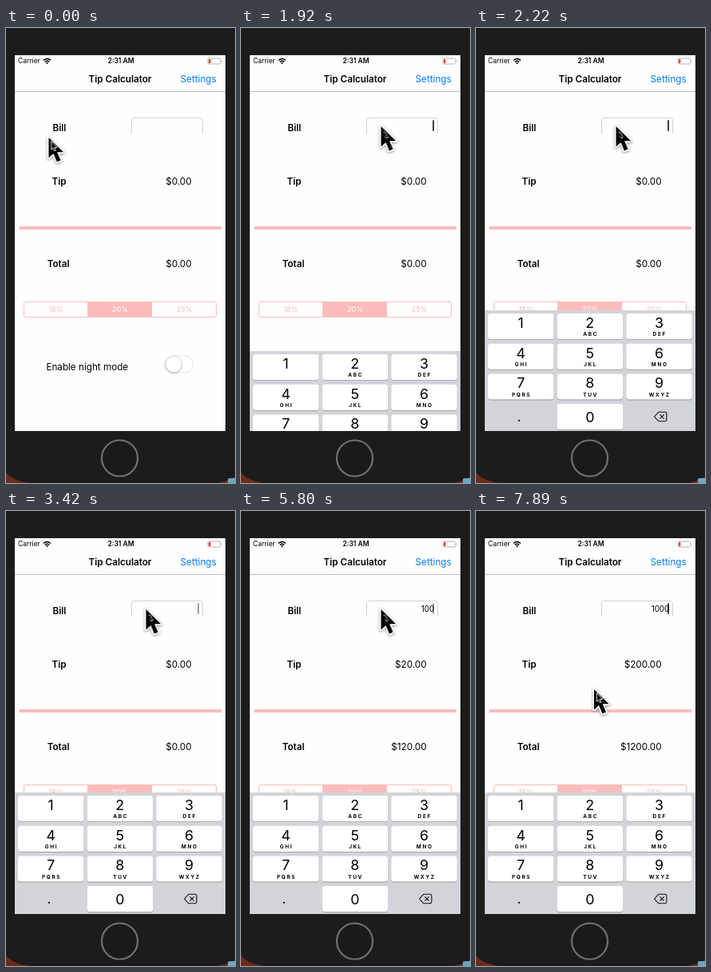
Animation, 287 px wide and 569 px high, one loop 8 s. Source, as an HTML page:

```html
<!DOCTYPE html>
<html lang="en">
<head>
<meta charset="utf-8">
<title>Tip Calculator</title>
<style>
  html, body { margin: 0; width: 100%; height: 100%; overflow: hidden; background: #1c1c1c; }
  svg { display: block; width: 100%; height: 100%; font-family: Inter, Roboto, "Open Sans", sans-serif; }
  .label { font-size: 11.7px; }
  .bold { font-weight: 600; }
  .small { font-size: 8.5px; }
  .seg { font-size: 9px; fill: #fbbcbc; }
  .bill { font-size: 9.8px; }
  .digit { font-size: 17.8px; }
  .letters { font-size: 6.4px; font-weight: 700; letter-spacing: 1.7px; }
  .mid { text-anchor: middle; }
  .end { text-anchor: end; }

  #values, #keyboard, #caret, #cursor, #hand, #arrow { animation: 8s step-end infinite; }
  #values { animation-name: values; }
  #keyboard { animation-name: rise; }
  #caret { animation-name: blink; }
  #cursor { animation-name: move; }
  #arrow { animation-name: arrow; }
  #hand { animation-name: hand; }

  /* Each amount sits 600px below the previous one. */
  @keyframes values {
    0% { transform: translateY(0); }
    46.375% { transform: translateY(-600px); }
    55.625% { transform: translateY(-1200px); }
    59.375% { transform: translateY(-1800px); }
    85.625%, 100% { transform: translateY(-2400px); }
  }
  @keyframes rise {
    0% { transform: translateY(160px); }
    24% { transform: translateY(52px); }
    25.875% { transform: translateY(10px); }
    27.75% { transform: translateY(1px); }
    29.625%, 100% { transform: translateY(0); }
  }
  @keyframes blink {
    0%, 31.5%, 44.625%, 53.75%, 68.75%, 81.875%, 93.125% { opacity: 0; }
    29.625%, 35.25%, 42.75%, 51.875%, 66.875%, 72.5%, 80%, 91.25%, 96.875% { opacity: .5; }
    24%, 37.125%, 46.375%, 55.625%, 74.375%, 85.625%, 98.625%, 100% { opacity: 1; }
  }
  @keyframes move {
    0% { transform: translate(53.5px, 137px); }
    1.875% { transform: translate(55px, 143px); }
    3.75% { transform: translate(66px, 155px); }
    5.625% { transform: translate(94px, 159px); }
    7.5% { transform: translate(134px, 147px); }
    9.375% { transform: translate(165px, 129px); }
    11% { transform: translate(175.5px, 123px); }
    95% { transform: translate(170px, 150px); }
    96.875% { transform: translate(155px, 200px); }
    98.625%, 100% { transform: translate(148px, 223px); }
  }
  @keyframes arrow {
    0%, 95%, 100% { opacity: 1; }
    11% { opacity: 0; }
  }
  @keyframes hand {
    0%, 95%, 100% { opacity: 0; }
    11% { opacity: 1; }
  }
</style>
</head>
<body>
<svg viewBox="0 0 287 569" preserveAspectRatio="none">
  <clipPath id="screen"><rect x="11" y="34" width="264" height="470"/></clipPath>

  <rect width="287" height="569" fill="#1c1c1c"/>
  <path d="M0 556Q8 566 28 569H0Z" fill="#6e2a1a"/>
  <path d="M287 561Q280 566 266 569H287Z" fill="#6e2a1a"/>
  <path d="M287 563H280Q278 563 278 565V569H287Z" fill="#69a7c6"/>
  <circle cx="142.5" cy="538" r="22.5" fill="#1a1a1a" stroke="#707070" stroke-width="2.2"/>

  <g clip-path="url(#screen)">
    <rect x="11" y="34" width="264" height="470" fill="#fefefe"/>
    <rect x="11" y="79" width="264" height="1" fill="#bcbcbc"/>

    <text class="small" x="15" y="44.3">Carrier</text>
    <g fill="none" stroke="#000" stroke-width="1.4">
      <path d="M47 40.6Q51.5 36.4 56 40.6M48.8 42.4Q51.5 40 54.2 42.4"/>
    </g>
    <path d="M51.5 45.2L49.9 43.5Q51.5 42.3 53.1 43.5Z"/>
    <text class="small bold mid" x="144" y="44.3">2:31 AM</text>
    <rect x="252.9" y="38" width="16" height="7" rx="1.6" fill="none" stroke="#aaa0a0" stroke-width=".8"/>
    <rect x="254" y="39" width="2.4" height="5" rx=".5" fill="#f33a30"/>
    <path d="M270 40.2Q271.4 41.5 270 42.8Z" fill="#aaa0a0"/>

    <text class="label bold mid" x="143" y="68">Tip Calculator</text>
    <text class="label" x="218.6" y="68" fill="#007aff">Settings</text>

    <text class="label bold mid" x="67" y="129">Bill</text>
    <text class="label bold mid" x="66.6" y="196.3">Tip</text>
    <text class="label bold mid" x="65.6" y="298.8">Total</text>
    <path d="M157.5 132V115.5Q157.5 112.5 160.5 112.5H243.5Q246.5 112.5 246.5 115.5V132" fill="none" stroke="#d0d0d0"/>
    <rect x="16.5" y="248" width="253.5" height="4" fill="#fbbcbc"/>

    <g id="values"></g>
    <rect id="caret" x="240.3" y="115.3" width="1.5" height="13.5"/>

    <rect x="22.5" y="342.5" width="241" height="19" rx="2" fill="none" stroke="#fbbcbc"/>
    <rect x="102" y="342" width="81" height="20" fill="#fbbcbc"/>
    <text class="seg mid" x="62.5" y="355.4">18%</text>
    <text class="seg mid" x="143" y="355.4" style="fill:#fff">20%</text>
    <text class="seg mid" x="223.5" y="355.4">25%</text>

    <text class="label" x="50.4" y="428.3">Enable night mode</text>
    <rect x="199.5" y="410" width="35" height="21" rx="10.5" fill="#fff" stroke="#e2e2e2"/>
    <circle cx="210" cy="420.5" r="10" fill="#fff" stroke="#dcdcdc" stroke-width=".6"
      style="filter:drop-shadow(0 1.5px 1.5px rgba(0,0,0,.28))"/>

    <g id="keyboard">
      <rect x="11" y="352" width="264" height="152" fill="#d2d4da"/>
      <g id="keys"></g>
      <circle cx="54" cy="489.8" r="1.1"/>
      <path d="M223.5 485L228.2 479.8Q228.7 479.3 229.4 479.3H237Q238.9 479.3 238.9 481.2V488.8Q238.9 490.7 237 490.7H229.4Q228.7 490.7 228.2 490.2ZM230.4 482.4L235.6 487.6M235.6 482.4L230.4 487.6"
        fill="none" stroke="#111" stroke-width="1.1" stroke-linejoin="round"/>
    </g>
  </g>

  <g id="cursor">
    <path d="M0 0V25.5L6 20L10.4 30.5L15 28.5L10.6 18.2H18.6Z" stroke="#fff" stroke-width="3.6"
      stroke-linejoin="round" paint-order="stroke" style="filter:drop-shadow(0 1.5px 1.5px rgba(0,0,0,.45))"/>
    <g fill="none" stroke="#fff" stroke-width=".9" stroke-linejoin="round">
      <path id="arrow" d="M3.2 4.5V15.2L5.6 13L7.3 16.8L9 16L7.4 12.3H10.8Z"/>
      <path id="hand" d="M2.8 8Q4.5 5.5 6 8.2L7.8 12.5Q9 14.8 6.8 15L4.6 12.6" stroke="#ddd"/>
    </g>
  </g>
</svg>
<script>
  const byId = id => document.getElementById(id);
  const text = (cls, x, y, s) => `<text class="${cls}" x="${x}" y="${y}">${s}</text>`;

  byId("values").innerHTML = [0, 1, 10, 100, 1000].map((bill, i) => {
    const tip = bill * 0.2;
    return `<g transform="translate(0 ${i * 600})">` +
      (bill ? text("bill end", 242.2, 126.4, bill) : "") +
      text("label end", 232.6, 195.8, "$" + tip.toFixed(2)) +
      text("label end", 232.6, 299.4, "$" + (bill + tip).toFixed(2)) + "</g>";
  }).join("");

  const letters = ["", "ABC", "DEF", "GHI", "JKL", "MNO", "PQRS", "TUV", "WXYZ"];
  const key = (col, row, digit, label) => {
    const x = 15 + col * 86.6, y = 356 + row * 37.7, mid = x + 41.2;
    const box = (dy, fill) =>
      `<rect x="${x}" y="${y + dy}" width="82.6" height="32.2" rx="3.5" fill="${fill}"/>`;
    return box(0.9, "#96989d") + box(0, "#fff") +
      text("digit mid", mid, y + (digit ? 17.9 : 22.6), digit) +
      (label ? text("letters mid", mid + 0.85, y + 28.4, label) : "");
  };
  byId("keys").innerHTML =
    letters.map((s, i) => key(i % 3, Math.floor(i / 3), i + 1, s)).join("") + key(1, 3, 0, "");
</script>
</body>
</html>
```
